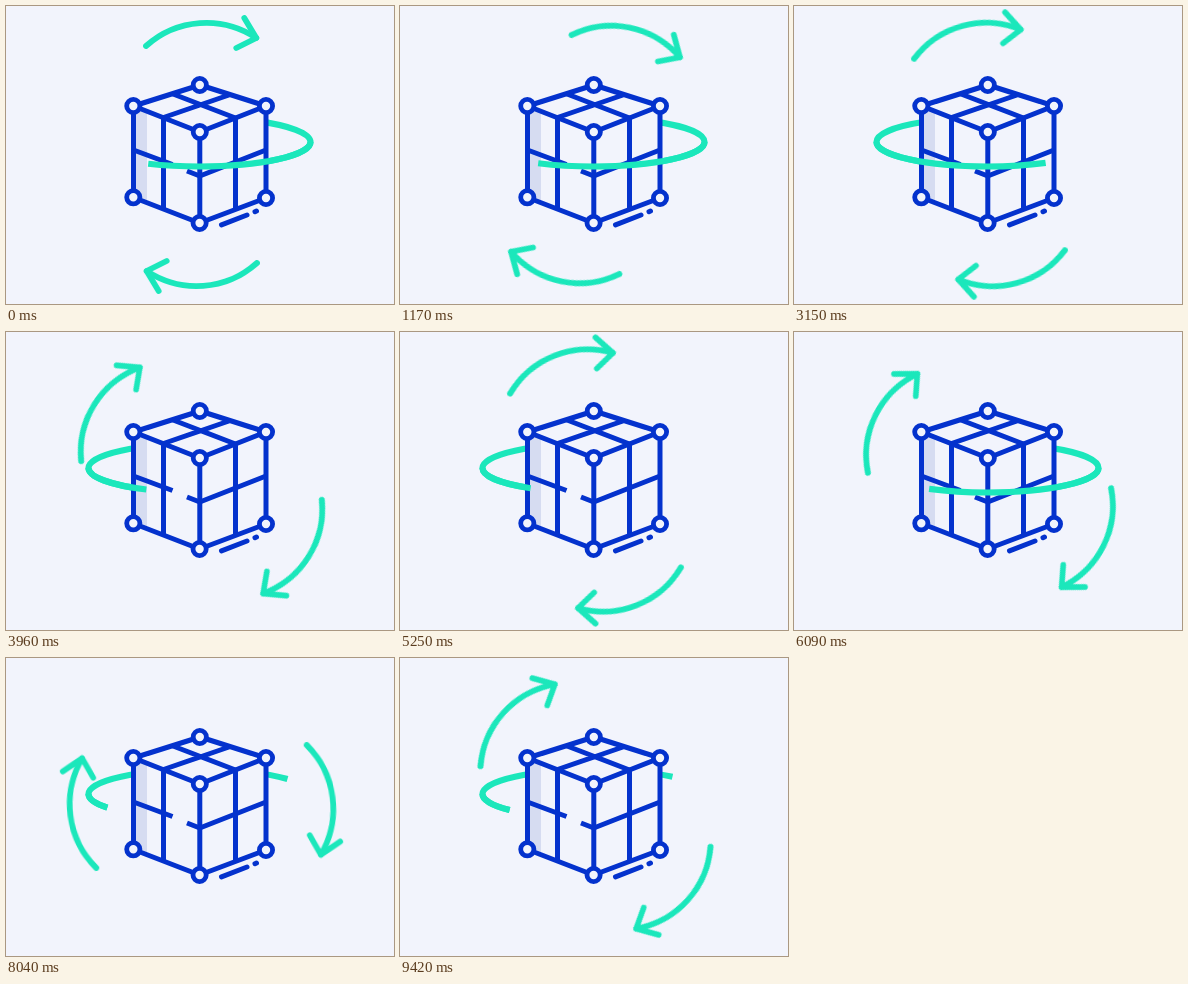
Write an HTML page that moves like this. It is 388x298 px and loops after 9.45 s.

```html
<!DOCTYPE html>
<html lang="en">
<head>
<meta charset="utf-8">
<title>Rotating cube</title>
<style>
  :root { --bg: #f2f4fc; --blue: #0432cd; --green: #1be7bb; }
  html, body { margin: 0; width: 100%; height: 100%; overflow: hidden; background: var(--bg); }
  svg { display: block; width: 100vw; height: 100vh; }
  .line { fill: none; stroke: var(--blue); stroke-width: 5; stroke-linejoin: round; }
  .round { stroke-linecap: round; }
  .face { fill: var(--bg); }
  .shade { fill: #d6dcf1; }
  .knots circle { fill: var(--bg); stroke: var(--blue); stroke-width: 4.8; }
  .arrow { fill: none; stroke: var(--green); stroke-width: 5.8; stroke-linecap: round; stroke-linejoin: round; }
  .arrow .shaft { stroke-dasharray: 35 17 10.5 13.5 43; }

  .spin, .ring {
    animation: spin 9450ms -8ms infinite;
  }
  .spin { transform-origin: 195.5px 148.5px; }
  .ring {
    fill: none; stroke: var(--green); stroke-width: 6.2;
    stroke-dasharray: 490 510;
    animation-name: orbit;
  }

  /* The picture advances in ticks of 30 ms. */
  @keyframes spin {
    0%        { transform: rotate(0deg);      animation-timing-function: steps(79); }
    25.07937% { transform: rotate(396.6deg);  animation-timing-function: steps(53); }
    41.90476% { transform: rotate(666.2deg);  animation-timing-function: steps(43); }
    55.55556% { transform: rotate(882.6deg);  animation-timing-function: steps(57); }
    73.65079% { transform: rotate(1163.8deg); animation-timing-function: steps(36); }
    85.07937% { transform: rotate(1346.8deg); animation-timing-function: steps(46); }
    99.68254%, 100% { transform: rotate(1576.4deg); }
  }
  @keyframes orbit {
    0%        { stroke-dashoffset: -119; animation-timing-function: steps(79); }
    25.07937% { stroke-dashoffset: 1889; animation-timing-function: steps(53); }
    41.90476% { stroke-dashoffset: 3387; animation-timing-function: steps(43); }
    55.55556% { stroke-dashoffset: 4366; animation-timing-function: steps(57); }
    73.65079% { stroke-dashoffset: 5383; animation-timing-function: steps(36); }
    85.07937% { stroke-dashoffset: 6302; animation-timing-function: steps(46); }
    99.68254%, 100% { stroke-dashoffset: 7321; }
  }
</style>
</head>
<body>
<svg viewBox="0 0 388 298">
  <defs>
    <clipPath id="front"><rect y="136" width="388" height="60"/></clipPath>
    <path id="orbit" pathLength="1000"
      d="M193.5 111.5A111 24.5 0 0 1 193.5 160.5A111 24.5 0 0 1 193.5 111.5"/>
    <g id="arrow">
      <path class="shaft" pathLength="119" d="M140 40A90 90 0 0 1 250.3 32"/>
      <path d="M238.3 12L250.3 32L230.3 42"/>
    </g>
  </defs>

  <g class="arrow spin">
    <use href="#arrow"/>
    <use href="#arrow" transform="rotate(180 195.5 148.5)"/>
  </g>

  <use class="ring" href="#orbit"/>

  <path class="face" d="M194 79L260 100V192L193.5 217L127.5 191.5V100Z"/>
  <path class="shade" d="M130 101L141 105V196L130 192Z"/>
  <g class="line">
    <path d="M194 79L260 100V192L193.5 217L127.5 191.5V100Z"/>
    <path d="M127.5 100L193.8 126L260 100M193.8 126V217"/>
    <path d="M167 88L229.5 112V204M223 89L157.5 111.5V204"/>
    <path d="M127.5 144L166.5 158.5M181 165L193.8 170L260 144"/>
    <path class="round" d="M215.5 218.8L241 209M249 205.7L250.5 205"/>
  </g>
  <g class="knots">
    <circle cx="193.8" cy="79" r="6.6"/>
    <circle cx="127.3" cy="100" r="6.6"/>
    <circle cx="260" cy="100" r="6.6"/>
    <circle cx="193.8" cy="126" r="6.6"/>
    <circle cx="127.3" cy="191.3" r="6.6"/>
    <circle cx="260" cy="192" r="6.6"/>
    <circle cx="193.6" cy="217" r="6.6"/>
  </g>

  <g clip-path="url(#front)"><use class="ring" href="#orbit"/></g>
</svg>
</body>
</html>
```
